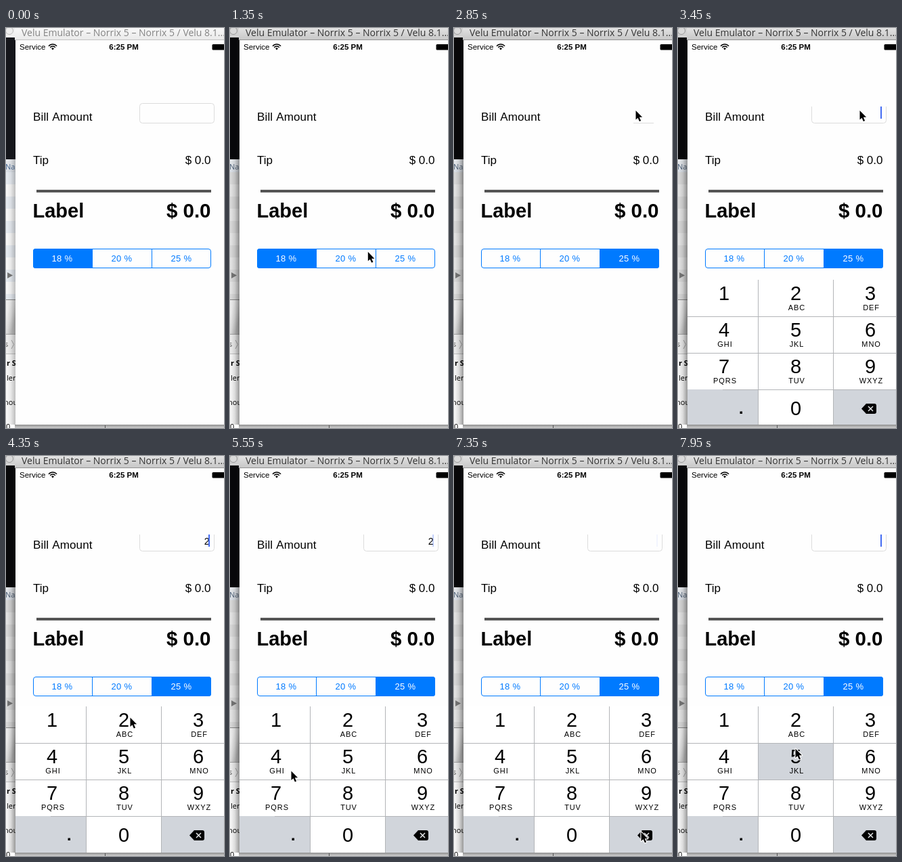
Recreate the animation shown at these times as an HTML page with a canvas. Size 322 px wide and 591 px high, loop 8000 ms.

```html
<!DOCTYPE html>
<html lang="en">
<head>
<meta charset="utf-8">
<title>Tip calculator</title>
<style>
html, body { margin: 0; width: 100%; height: 100%; overflow: hidden; background: #fff; }
canvas { display: block; width: 322px; height: 591px; }
</style>
</head>
<body>
<canvas id="stage"></canvas>
<script>
const W = 322, H = 591, LOOP = 8000, STEP = 150;
const BLUE = '#007aff', KEY_GREY = '#d1d5db';
const SANS = '"Liberation Sans", Arial, sans-serif';
const UI = '"Open Sans", "DejaVu Sans", sans-serif';

// Moments of the interaction, in ms
const SHOW_POINTER = 750, ACTIVATE = 1050, PICK_20 = 1500, PICK_25 = 2100;
const FOCUS = 3150, PRESS_2 = 4200, TYPE_2 = 4350;
const PRESS_DELETE = 7050, RELEASE_DELETE = 7350, PRESS_5 = 7950;

const canvas = document.getElementById('stage');
const dpr = window.devicePixelRatio || 1;
canvas.width = W * dpr;
canvas.height = H * dpr;
const c = canvas.getContext('2d');

const clamp = v => Math.min(1, Math.max(0, v));
const ease = k => k * k * (3 - 2 * k);

// Each move eases the pointer to a new resting place
const moves = [
  { from: ACTIVATE, to: PICK_20, x: 174, y: 341 },
  { from: PICK_20, to: 1800, x: 248, y: 339 },
  { from: PICK_25, to: 2700, x: 268, y: 121.5 },
  { from: 3450, to: 4050, x: 183, y: 386 },
  { from: 4500, to: 4800, x: 100, y: 542 },
  { from: 4800, to: 5100, x: 90, y: 465 },
  { from: 6150, to: 6750, x: 276, y: 555 },
  { from: RELEASE_DELETE, to: 7950, x: 173, y: 432 }
];

function pointerAt(t) {
  let x = 287, y = 300;
  for (const m of moves) {
    const k = ease(clamp((t - m.from) / (m.to - m.from)));
    x += (m.x - x) * k;
    y += (m.y - y) * k;
  }
  return [x, y];
}

// The blink restarts whenever the field changes
function caretAlpha(t) {
  const restart = t >= PRESS_DELETE ? PRESS_DELETE : t >= TYPE_2 ? TYPE_2 : FOCUS + STEP;
  const phase = (t - restart) % 940;
  return clamp((Math.abs(phase - 450) - 140) / 160);
}

function rect(x, y, w, h, fill) {
  c.fillStyle = fill;
  c.fillRect(x, y, w, h);
}

function text(str, x, y, font, color = '#000', align = 'left', spacing = 0) {
  c.font = font;
  c.fillStyle = color;
  c.textAlign = align;
  c.letterSpacing = spacing + 'px';
  c.fillText(str, x, y);
}

function stroke(points, color, width) {
  c.beginPath();
  points.forEach(([x, y]) => c.lineTo(x, y));
  c.strokeStyle = color;
  c.lineWidth = width;
  c.stroke();
}

function outline(x, y, w, h, r, color) {
  c.strokeStyle = color;
  c.lineWidth = 1;
  c.beginPath();
  c.roundRect(x, y, w, h, r);
  c.stroke();
}

function fade(x0, y0, x1, y1, ...stops) {
  const g = c.createLinearGradient(x0, y0, x1, y1);
  stops.forEach((s, i) => g.addColorStop(i / (stops.length - 1), s));
  return g;
}

function clipped(x, y, w, h, r, draw) {
  c.save();
  c.beginPath();
  c.roundRect(x, y, w, h, r);
  c.clip();
  draw();
  c.restore();
}

function drawBackdrop(active) {
  rect(0, 0, W, H, '#fff');
  rect(0, 14, 14, 180, active ? '#08080a' : '#15161b');
  rect(0, 194, 14, 22, fade(0, 194, 0, 216, '#f1f4f8', '#dfe5ed'));
  text('Na', -1, 209, '11px ' + UI, active ? '#56687f' : '#4d6f9b');
  rect(0, 213, 14, 189, active ? '#ececec' : '#fff');
  for (let y = 213; y < 402; y += 36) {
    rect(0, y, 14, 18, active ? '#e0e0e0' : '#edf2f8');
  }
  c.fillStyle = '#7b7b7b';
  c.beginPath();
  c.moveTo(2, 361);
  c.lineTo(10, 365.5);
  c.lineTo(2, 370);
  c.fill();
  rect(0, 402, 14, 51, fade(0, 425, 14, 429, '#f5f5f5', '#e4e4e4', '#c4c4c4'));
  rect(0, 401, 14, 1, '#8b8b8b');
  rect(0, 453, 14, 29, '#f4f4f4');
  rect(0, 452, 14, 1, '#a5a5a5');
  rect(0, 481, 14, 1, '#c8c8c8');
  text('s', -2, 471, '11px ' + UI, '#555');
  stroke([[8, 461], [11.5, 467.5], [8, 474]], '#aaa', 1);
  text('r S', 1, 499, 'bold 11px ' + UI);
  text('ler', 1, 521, '11px ' + UI);
  text('nou', -3, 557, '11px ' + UI);
  text('0', 0, 593, '11px ' + UI);
  const dark = active ? .4 : .26;
  rect(0, 194, 14, 392, fade(0, 0, 14, 0, 'rgba(0,0,0,.02)', `rgba(0,0,0,${dark / 3})`, `rgba(0,0,0,${dark})`));
  rect(13, 586, W, 5, fade(0, 586, 0, 591, '#8f8f8f', '#cfcfcf'));
  rect(146, 587, 1, 4, '#555');
}

function drawTitle(active) {
  rect(0, 0, W, 14, active ? '#d2d2d2' : '#f0f0f0');
  const bar = active ? ['#e2e2e2', '#c6c6c6'] : ['#f8f8f8', '#e9e9e9'];
  rect(13, 0, W, 18, fade(0, 0, 0, 18, ...bar));
  rect(13, 17, W, 1, active ? '#929292' : '#c2c2c2');
  c.fillStyle = active ? '#d9d9d9' : '#eee';
  c.beginPath();
  c.arc(5, 4, 5.5, 0, 7);
  c.fill();
  outline(-.5, -1.5, 11, 11, 5.5, active ? '#999' : '#bbb');
  text('Velu Emulator – Norrix 5 – Norrix 5 / Velu 8.1...', 23, 12, '14px ' + UI,
    active ? '#333' : '#838383');
}

function drawStatus() {
  text('Service', 20, 32, '11.5px ' + SANS);
  text('6:25 PM', 174, 32, 'bold 11.5px ' + SANS, '#000', 'center');
  c.strokeStyle = '#000';
  c.lineWidth = 1.6;
  for (const r of [8, 5]) {
    c.beginPath();
    c.arc(69, 32, r, -Math.PI * .77, -Math.PI * .23);
    c.stroke();
  }
  c.fillStyle = '#000';
  c.beginPath();
  c.moveTo(69, 32.5);
  c.arc(69, 32, 2.6, -Math.PI * .77, -Math.PI * .23);
  c.fill();
  c.beginPath();
  c.roundRect(304.5, 24, 24, 8.5, 1.5);
  c.fill();
}

function drawField(t) {
  const border = '#dcdcdc';
  if (t >= ACTIVATE && t < FOCUS) {
    if (t >= 2550) rect(265, 140, 30, 1, border);
    return;
  }
  const top = t < ACTIVATE ? 100 : 116;
  clipped(190, top, 120, 60, 0, () => outline(197.5, 111.5, 110, 29, 4, border));
  if (t >= TYPE_2 && t < PRESS_DELETE) text('2', 300.5, 131, '14px ' + SANS, '#000', 'right');
  if (t > FOCUS) {
    c.globalAlpha = caretAlpha(t);
    rect(299, 116, 2, 18, '#426bf2');
    c.globalAlpha = 1;
  }
}

function drawSegments(selected) {
  clipped(40, 326, 263, 29, 3.5, () => rect(40 + 87.5 * selected, 326, 88, 29, BLUE));
  outline(40.5, 326.5, 262, 28, 3.5, BLUE);
  rect(127, 326, 1, 29, BLUE);
  rect(215, 326, 1, 29, BLUE);
  [18, 20, 25].forEach((rate, i) => {
    text(rate + ' %', 83 + 88 * i, 345, '13px ' + SANS, i === selected ? '#fff' : BLUE, 'center', .3);
  });
}

function drawDeleteIcon(cross) {
  c.fillStyle = '#000';
  c.beginPath();
  c.moveTo(271, 560.5);
  c.lineTo(278, 553);
  c.lineTo(286, 553);
  c.lineTo(286, 568);
  c.lineTo(278, 568);
  c.fill();
  c.beginPath();
  c.roundRect(277, 553, 16, 15, 3);
  c.fill();
  stroke([[281, 557], [288, 564]], cross, 1.5);
  stroke([[288, 557], [281, 564]], cross, 1.5);
}

function drawKeypad(shift, pressed) {
  const edges = [14, 118, 229, W], centers = [68, 174, 284];
  const letters = ['', 'ABC', 'DEF', 'GHI', 'JKL', 'MNO', 'PQRS', 'TUV', 'WXYZ'];
  const line = '#b3b5b8';
  clipped(14, 340, W, 246, 0, () => {
    c.translate(0, shift);
    rect(14, 370, W, 216, '#fff');
    for (let i = 0; i < 12; i++) {
      const col = i % 3, y = 370 + Math.floor(i / 3) * 54;
      const grey = (i === 9 || i === 11) !== (i === pressed);
      if (grey) rect(edges[col], y, edges[col + 1] - edges[col], 54, KEY_GREY);
    }
    rect(14, 424, W, 1, line);
    rect(14, 478, W, 1, line);
    rect(66, 532, W, 1, line);
    rect(118, 370, 1, 216, line);
    rect(229, 370, 1, 216, line);
    letters.forEach((label, i) => {
      const x = centers[i % 3], y = 370 + Math.floor(i / 3) * 54;
      text(String(i + 1), x, y + 30, '29px ' + SANS, '#000', 'center');
      text(label, x + 1.5, y + 45, '11px ' + SANS, '#000', 'center', .9);
    });
    text('0', 174, 570, '29px ' + SANS, '#000', 'center');
    rect(91.5, 564.5, 3.5, 3.5, '#000');
    drawDeleteIcon(pressed === 11 ? '#fff' : '#e9ebee');
  });
}

function drawPointer(x, y) {
  const shape = [[0, 0], [0, 13.5], [3, 10.8], [5.4, 16], [7.6, 15], [5.3, 9.8], [9.6, 9.8]];
  c.beginPath();
  shape.forEach(([dx, dy]) => c.lineTo(x + .5 + dx, y + .5 + dy));
  c.closePath();
  c.lineJoin = 'round';
  c.strokeStyle = '#fff';
  c.lineWidth = 2.4;
  c.stroke();
  c.fillStyle = '#000';
  c.fill();
}

function pressedKey(t) {
  if (t >= PRESS_2 && t < TYPE_2) return 1;
  if (t >= PRESS_DELETE && t < RELEASE_DELETE) return 11;
  return t >= PRESS_5 ? 4 : -1;
}

function draw(time) {
  const t = Math.floor(time / STEP) * STEP;
  const active = t >= ACTIVATE;
  c.setTransform(dpr, 0, 0, dpr, 0, 0);
  drawBackdrop(active);
  drawTitle(active);
  rect(14, 18, W, 568, '#fefefe');
  drawStatus();
  text('Bill Amount', 40, 136.5, '17px ' + SANS, '#000', 'left', .15);
  text('Tip', 40, 200.5, '17px ' + SANS);
  text('$ 0.0', 302.5, 200.5, '17px ' + SANS, '#000', 'right');
  drawField(t);
  rect(45, 239, 258, 4, '#555');
  text('Label', 39.5, 279.5, 'bold 29px ' + SANS);
  text('$ 0.0', 302.5, 279.5, 'bold 29.5px ' + SANS, '#000', 'right');
  drawSegments(t < PICK_20 ? 0 : t < PICK_25 ? 1 : 2);
  if (t >= FOCUS) {
    const shift = 216 * Math.exp((FOCUS - 100 - t) / 85);
    drawKeypad(Math.round(shift), pressedKey(t));
  }
  if (t >= SHOW_POINTER) drawPointer(...pointerAt(t));
}

const start = performance.now();
function tick() {
  draw((performance.now() - start) % LOOP);
  requestAnimationFrame(tick);
}
tick();
</script>
</body>
</html>
```
